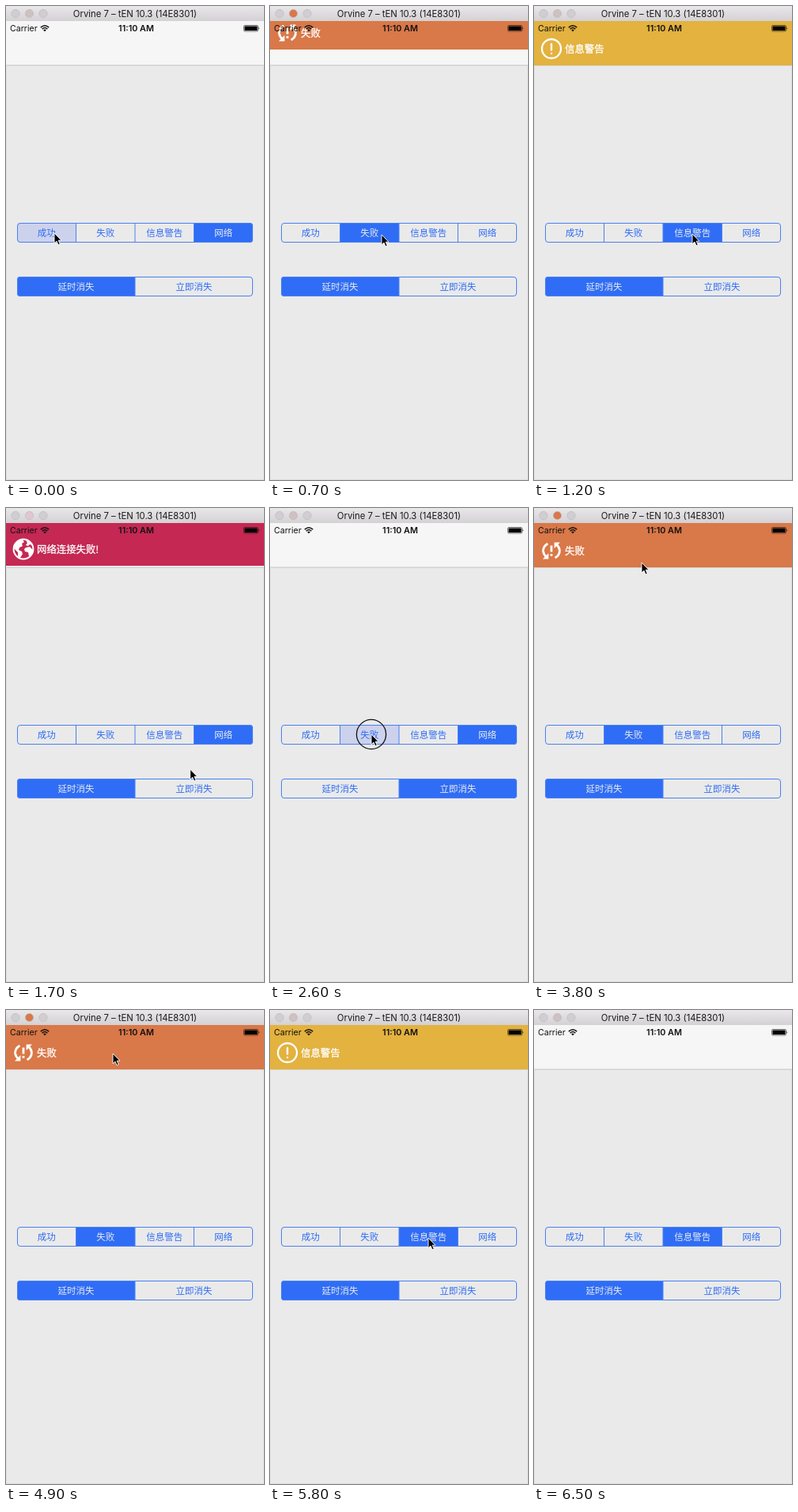
An HTML page for the animation above (6.6 s loop, 326 px wide and 599 px high).

```html
<!DOCTYPE html>
<html lang="zh-CN">
<head>
<meta charset="utf-8">
<title>通知横幅</title>
<style>
  html, body { margin: 0; width: 100%; height: 100%; overflow: hidden; background: #eaeaea; }
  svg { display: block; width: 326px; height: 599px; }
  text { font-family: Inter, "Noto Sans CJK SC", "Noto Sans CJK", sans-serif; }
  .cjk { font-family: "Noto Sans CJK SC", "Noto Sans CJK", sans-serif; }
  .mid { text-anchor: middle; }
</style>
</head>
<body>
<svg viewBox="0 0 326 599" xmlns="http://www.w3.org/2000/svg">
  <defs>
    <linearGradient id="bar" x2="0" y2="1">
      <stop stop-color="#e9e7e9"/><stop offset="1" stop-color="#d3d1d3"/>
    </linearGradient>
    <clipPath id="screen"><rect y="19" width="326" height="580"/></clipPath>
    <clipPath id="row0"><rect x="14" y="274" width="298" height="25" rx="4"/></clipPath>
    <clipPath id="row1"><rect x="14" y="342" width="298" height="25" rx="4"/></clipPath>
  </defs>

  <rect width="326" height="599" fill="#eaeaea"/>
  <rect y="19" width="326" height="56" fill="#f6f6f6"/>
  <rect y="74.5" width="326" height="1" fill="#c4c4c4"/>
  <path d="M.5 75V598.5H325.5V75" fill="none" stroke="#dcdcdc" stroke-width=".8"/>
  <g id="rows"></g>
  <g id="banners" clip-path="url(#screen)"></g>

  <g id="status">
    <text x="5" y="32" font-size="10.6" fill="#111">Carrier</text>
    <path d="M43.8 27.1Q49 22.3 54.2 27.1M45.7 29.1Q49 26 52.3 29.1" fill="none" stroke="#111" stroke-width="1.5"/>
    <path d="M47.2 30.4Q49 28.8 50.8 30.4L49 32.3Z" fill="#111"/>
    <text class="mid" x="164.5" y="32" font-size="10.8" font-weight="600" fill="#111">11:10 AM</text>
    <rect x="300.5" y="24.5" width="18" height="7.5" rx="1.5" fill="none" stroke="#111" stroke-width=".6"/>
    <rect x="301.5" y="25.5" width="16" height="5.5" rx=".6"/>
    <path d="M319.6 26.8q1.6 1.4 0 2.9z"/>
  </g>

  <rect width="326" height="19" fill="url(#bar)"/>
  <g fill="#d0ced0" stroke="#bbb9bb" stroke-width=".7">
    <circle cx="12" cy="9.5" r="5.1"/>
    <circle id="light" cx="29.5" cy="9.5" r="5.1"/>
    <circle cx="47" cy="9.5" r="5.1"/>
  </g>
  <text class="mid" x="163" y="13.6" font-size="11.3" fill="#1a1a1a">Orvine 7 – tEN 10.3 (14E8301)</text>

  <circle id="ring" r="18.6" fill="none" stroke="#111" stroke-width="1.3"/>
  <path id="cursor" d="M0 0V12.8L3 10.1L5 14.8L7.2 13.8L5.2 9.2H9Z"
        fill="#000" stroke="#fff" stroke-width=".9" stroke-linejoin="round"/>
</svg>

<script>
const LOOP = 6600, STEP = 100;
const BLUE = '#2f6df6', EDGE = '#4a80f2', PALE = '#ccd2ec', GREY = '#eaeaea';
const $ = id => document.getElementById(id);

function add(parent, tag, attrs, text) {
  const el = document.createElementNS('http://www.w3.org/2000/svg', tag);
  for (const k in attrs) el.setAttribute(k, attrs[k]);
  if (text) el.textContent = text;
  parent.appendChild(el);
  return el;
}

// Segmented control; returns its painter
function makeRow(labels, y, clip) {
  const w = 298 / labels.length, g = add($('rows'), 'g', {});
  const inner = add(g, 'g', { 'clip-path': `url(#${clip})` });
  const cells = labels.map((label, i) => ({
    box: add(inner, 'rect', { x: 14 + i * w, y, width: w, height: 25 }),
    text: add(g, 'text', { class: 'cjk mid', x: 14 + (i + .5) * w, y: y + 16.8, 'font-size': 11.5 }, label)
  }));
  for (let i = 1; i < labels.length; i++)
    add(inner, 'rect', { x: 13.5 + i * w, y, width: 1, height: 25, fill: EDGE });
  add(g, 'rect', { x: 14.5, y: y + .5, width: 297, height: 24, rx: 3.5, fill: 'none', stroke: EDGE });
  return (selected, pressed) => cells.forEach((c, i) => {
    c.box.setAttribute('fill', i === selected ? BLUE : i === pressed ? PALE : 'none');
    c.text.setAttribute('fill', i === selected ? GREY : BLUE);
  });
}
const paintKinds = makeRow(['成功', '失败', '信息警告', '网络'], 274, 'row0');
const paintModes = makeRow(['延时消失', '立即消失'], 342, 'row1');

// Banner kinds in the order of their segments; icons are centred on 0,0
const line = d => `<path d="${d}" fill="none" stroke="#fff" stroke-width="2.4" stroke-linecap="round" stroke-linejoin="round"/>`;
const disc = '<circle r="12" fill="none" stroke="#fff" stroke-width="2.3"/>';
const arrow = 'M-1 -8.2Q-10 -5 -9.8 1Q-9.5 5 -6 8.2M-10 9.6H-3.2V2.8Z';
const KINDS = [
  { color: '#57b05c', label: '成功', icon: disc + line('M-5.5 .5L-1.5 4.5L6 -4') },
  {
    color: '#d97848', label: '失败', light: '#d97848',
    icon: [0, 180].map(a => `<g transform="rotate(${a})">
        <path d="M-4.6 -9Q-10.6 -5.6 -10.4 .4Q-10 4.6 -6.6 7.6" fill="none" stroke="#fff" stroke-width="2.8"/>
        <path d="M-11 10.4H-3.6V3Z" fill="#fff"/></g>`).join('') +
      '<path d="M-1.4 -6.6H1.4V1.6H-1.4ZM-1.4 4H1.4V6.8H-1.4Z" fill="#fff"/>'
  },
  { color: '#e3b23f', label: '信息警告', icon: disc + line('M0 -6V1.5M0 6V6.1') },
  {
    color: '#c42853', label: '网络连接失败!', light: '#e2c6cf',
    icon: `<circle r="12.4" fill="none" stroke="#fff" stroke-width="2"/>
      <path fill="#fff" d="M-11 -6Q-7 -12 -1 -12L1 -9L-2 -7L-1 -4L-5 -2L-6 1L-2 3L-1 6L-4 11L-7 9L-7 4L-12 -1Z
      M3 -11Q9 -10 11 -5L8 -6L6 -4L3 -5L5 -8Z
      M3 -2L8 -3L12 1Q11 7 7 9L6 4L2 3L1 0Z"/>`
  }
];

// Where the pointer goes, which segment it picks there, how long a banner holds
const STOPS = [
  { t: 100, x: 61, y: 287, kind: 0 },
  { t: 700, x: 141, y: 289, kind: 1 },
  { t: 1100, x: 200, y: 288, kind: 2 },
  { t: 1400, x: 272, y: 288, kind: 3 },
  { t: 2100, x: 219, y: 345, mode: 1 },
  { t: 2700, x: 128, y: 286, kind: 1, hold: 2300 },
  { t: 3300, x: 112, y: 364, mode: 0 },
  { t: 3900, x: 136, y: 69 },
  { t: 5000, x: 135, y: 55 },
  { t: 5700, x: 200, y: 288, kind: 2, hold: 600 },
  { t: 6200, x: 205, y: 330 },
  { t: 6600, x: 215, y: 850 }
];
const TRAVEL = 300, HOLD = 300;

const banners = STOPS.filter(s => 'kind' in s).map(s => {
  const kind = KINDS[s.kind], g = add($('banners'), 'g', {});
  add(g, 'rect', { y: -20, width: 326, height: 95, fill: kind.color });
  add(g, 'g', { transform: 'translate(22 54)' }).innerHTML = kind.icon;
  add(g, 'text', {
    class: 'cjk', x: 39, y: 58.6, 'font-size': 12.4, fill: '#fff', stroke: '#fff', 'stroke-width': .3
  }, kind.label);
  return { kind, from: s.t, to: s.t + (s.hold || HOLD), g };
});

// Vertical offset of a banner, or null when hidden
function slide({ from, to }, t) {
  if (t < from || t >= to + 200) return null;
  if (t < to) return t < from + 100 ? -20 : 0;
  return -2 - .36 * (t - to);
}

// Selected and pressed segment of a row; a press lasts one step
function pick(row, first, t) {
  const taps = STOPS.filter(s => row in s);
  const done = taps.filter(s => s.t <= t).pop();
  const press = taps.find(s => t < s.t && t >= s.t - STEP);
  return [done ? done[row] : first, press ? press[row] : -1];
}

// Leave a stop one step after its tap, travel, then rest at the next
function pointer(t) {
  const i = STOPS.findIndex(s => s.t + STEP > t);
  const b = STOPS[i], a = STOPS[i - 1] || b;
  const k = Math.min(1, Math.max(0, (t - a.t - STEP) / TRAVEL));
  const e = k * k * (3 - 2 * k);
  return [a.x + (b.x - a.x) * e, a.y + (b.y - a.y) * e];
}

function draw(t) {
  const kind = pick('kind', 3, t), mode = pick('mode', 0, t);
  paintKinds(...kind);
  paintModes(...mode);

  let light = '#cfc0c1';
  for (const b of banners) {
    const y = slide(b, t);
    b.g.style.display = y === null ? 'none' : '';
    if (y === null) continue;
    b.g.setAttribute('transform', `translate(0 ${y})`);
    light = b.kind.light || light;
  }
  $('light').setAttribute('fill', light);

  const at = `translate(${pointer(t).join(' ')})`;
  $('cursor').setAttribute('transform', at);
  $('ring').setAttribute('transform', at);
  $('ring').style.display = mode[0] === 1 && kind[1] >= 0 ? '' : 'none';
}

let start = null;
function tick(now) {
  if (start === null) start = now;
  const t = Math.max(0, now - start) % LOOP;
  draw(Math.floor(t / STEP) * STEP);
  requestAnimationFrame(tick);
}
draw(0);
requestAnimationFrame(tick);
</script>
</body>
</html>
```
